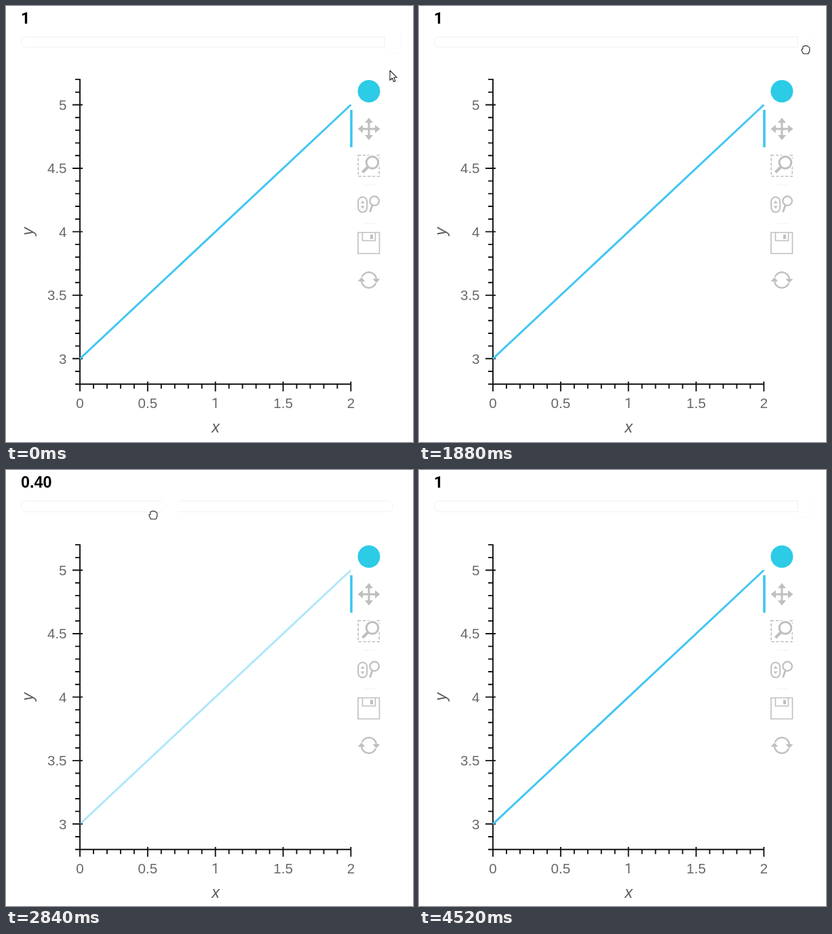
Recreate the animation shown at these times as an HTML page. Size 600 by 642 pixels, loop 4560 ms.

```html
<!DOCTYPE html>
<html lang="en">
<head>
<meta charset="utf-8">
<title>Slider and line plot</title>
<style>
  html, body { margin: 0; width: 100%; height: 100%; overflow: hidden; background: #fff; }
  svg { display: block; }
  text { font-family: "Liberation Sans", Arial, sans-serif; }
  .one { font-family: Roboto, "Liberation Sans", sans-serif; }
  .tick { font-size: 20.5px; fill: #686868; }
  .axis { font-size: 23.4px; font-style: italic; fill: #5c5c5c; text-anchor: middle; }
  .icon { fill: none; stroke: #bfbfbf; }
  .solid { fill: #bfbfbf; stroke: none; }
  #heading { font-size: 23.4px; font-weight: bold; }
  #pointer path { fill: #fff; stroke: #222; stroke-width: 1.1; stroke-linejoin: round; }
</style>
</head>
<body>
<svg width="600" height="642" viewBox="0 0 600 642">
  <text id="heading" x="22" y="26"></text>

  <rect id="bar" x="22.5" y="45.5" width="548" rx="7" fill="none" stroke="#f1f1f1"/>
  <rect id="handle" y="38" width="24" height="32" fill="#fff"/>
  <path id="handleEdge" d="M558 45V61" stroke="#efefef"/>
  <path id="handleSide" d="M581.5 40V69H560" fill="none" stroke="#fafafa"/>

  <g id="plot">
    <path id="ticks" fill="none" stroke="#111" stroke-width="1.9"/>
    <g id="labels"></g>
    <text class="axis" x="309" y="629.5">x</text>
    <text class="axis" transform="translate(39.5 334) rotate(-90)">y</text>
    <path id="line" d="M109 521.3L508.4 147.5" stroke="#42c6f3" stroke-width="3"/>

    <circle cx="535" cy="127.5" r="16.5" fill="#2ccbe6"/>
    <path d="M509 155V210" stroke="#3cc6ef" stroke-width="3.6"/>
    <path d="M527 265.5H545M527 322.5H545" stroke="#f3f3f3"/>

    <g class="icon">
      <path d="M535 173V193M525 183H545" stroke-width="3"/>
      <path class="solid" d="M535 166.5l6 7.5h-12zM535 199.5l6-7.5h-12zM518.5 183l7.5-6v12zM551.5 183l-7.5-6v12z"/>

      <rect x="519.2" y="221.8" width="31" height="31" stroke-width="1.6" stroke-dasharray="4.2 2.6"/>
      <circle cx="540" cy="232.5" r="10" fill="#fff" stroke="#fff" stroke-width="4"/>
      <circle cx="540" cy="232.5" r="8.8" stroke-width="3"/>
      <path d="M533.5 239L525.5 247" stroke-width="4.2"/>

      <rect x="519.2" y="283.2" width="13" height="22.4" rx="6.5" stroke-width="2"/>
      <path class="solid" d="M525.7 288.5l3 4h-6zM525.7 300.5l3-4h-6z"/>
      <circle cx="543.2" cy="289" r="6.8" stroke-width="2.3"/>
      <path d="M540 295.5L536.5 305.5" stroke-width="2.8"/>

      <path d="M519 335.5H550.5V366.5H519zM525.5 335.5V347.5H544.5V335.5" stroke-width="1.6"/>
      <rect class="solid" x="537" y="338.5" width="4" height="6.5"/>

      <path d="M524.8 401A11 11 0 0 1 546 404M545.2 410A11 11 0 0 1 524 407" stroke-width="2.4"/>
      <path class="solid" d="M524 401.5l5.5 6h-11zM546 409.8l5.5-6h-11z"/>
    </g>
  </g>

  <g id="pointer">
    <path id="arrow" d="M0 0V14.3L3.3 11.2L5.6 16.6L8 15.6L5.8 10.3H10.3Z"/>
    <path id="hand" d="M-3.5 6.2L-6 1.5Q-6.6-.8-4.2-.6V-3.4Q-3.6-5.8-1.8-4.6Q-.6-6.8 1-5Q2.8-6 3.6-4Q5.8-4.2 5.8-1.6V2Q5 4.4 4 6.2Z"/>
  </g>
</svg>

<script>
const LOOP = 4560, STEP = 40, LAG = 60;
const $ = id => document.getElementById(id);
const set = (el, attrs) => { for (const k in attrs) el.setAttribute(k, attrs[k]); };
const show = (el, on) => set(el, { visibility: on ? "visible" : "hidden" });

// Rows of [time, value, ...], joined by straight segments.
const pointerPath = [
  [0, 566, 95], [520, 571, 87], [600, 571, 86], [840, 573, 84], [1320, 573, 84],
  [1760, 571, 62], [1880, 570, 64], [2080, 543, 76], [2240, 507, 80], [2400, 438, 76],
  [2840, 217, 66], [3320, -20, 66], [3480, -20, 66], [3560, 60, 66],
  [3960, 453, 67], [4120, 620, 67], [4560, 620, 67]
];
const lineAlpha = [
  [0, 1], [2080, 1], [2240, .9], [2840, .42], [3320, 0], [3760, 0], [3960, .25], [4480, 1], [4560, 1]
];

function sample(rows, t) {
  const i = Math.max(1, rows.findIndex(row => row[0] >= t));
  const a = rows[i - 1], b = rows[i];
  const p = Math.max(0, (t - a[0]) / (b[0] - a[0]));
  return a.slice(1).map((v, k) => v + (b[k + 1] - v) * p);
}

function addLabel(value, x, y, anchor) {
  const text = document.createElementNS("http://www.w3.org/2000/svg", "text");
  set(text, { x, y, "text-anchor": anchor, class: value === 1 ? "tick one" : "tick" });
  text.textContent = value;
  $("labels").append(text);
}

function buildAxes() {
  let d = "M109 109.2V559.6M108 558.7H509.3";
  for (let i = 0; i <= 24; i++) {
    const y = 558.7 - i * 18.69, major = i % 5 === 2;
    d += `M${major ? 98 : 102} ${y}H${major ? 113 : 109}`;
    if (major) addLabel((28 + i) / 10, 89.5, y + 7.3, "end");
  }
  for (let i = 0; i <= 20; i++) {
    const x = 109 + i * 19.97, major = i % 5 === 0;
    d += `M${x} ${major ? 555 : 559}V${major ? 569.5 : 565.5}`;
    if (major) addLabel(i / 10, x, 593.5, "middle");
  }
  set($("ticks"), { d });
}

function sliderValue(t) {
  if (t < 1880) return 1;
  const [x] = sample(pointerPath, t - LAG);
  return Math.min(1, Math.max(0, Math.round((x - 22) / 54.8) / 10));
}

function draw(t) {
  const value = sliderValue(t), shifted = t >= 2040;
  $("heading").textContent = value % 1 ? value.toFixed(2) : value;
  set($("heading"), { class: value === 1 ? "one" : "" });

  set($("bar"), { height: shifted ? 16 : 15 });
  set($("handle"), { x: 10.8 + value * 548 });
  show($("handleEdge"), value === 1);
  show($("handleSide"), value === 1);

  set($("plot"), { transform: `translate(0 ${shifted ? 0 : -2})` });
  set($("line"), { "stroke-opacity": sample(lineAlpha, t)[0] });

  const [x, y] = sample(pointerPath, t), grabbing = t >= 1600;
  set($("pointer"), { transform: `translate(${x} ${y})` });
  show($("arrow"), !grabbing);
  show($("hand"), grabbing);
}

function frame() {
  const t = performance.now() % LOOP;
  draw(Math.floor(t / STEP) * STEP);
  requestAnimationFrame(frame);
}

buildAxes();
frame();
</script>
</body>
</html>
```
